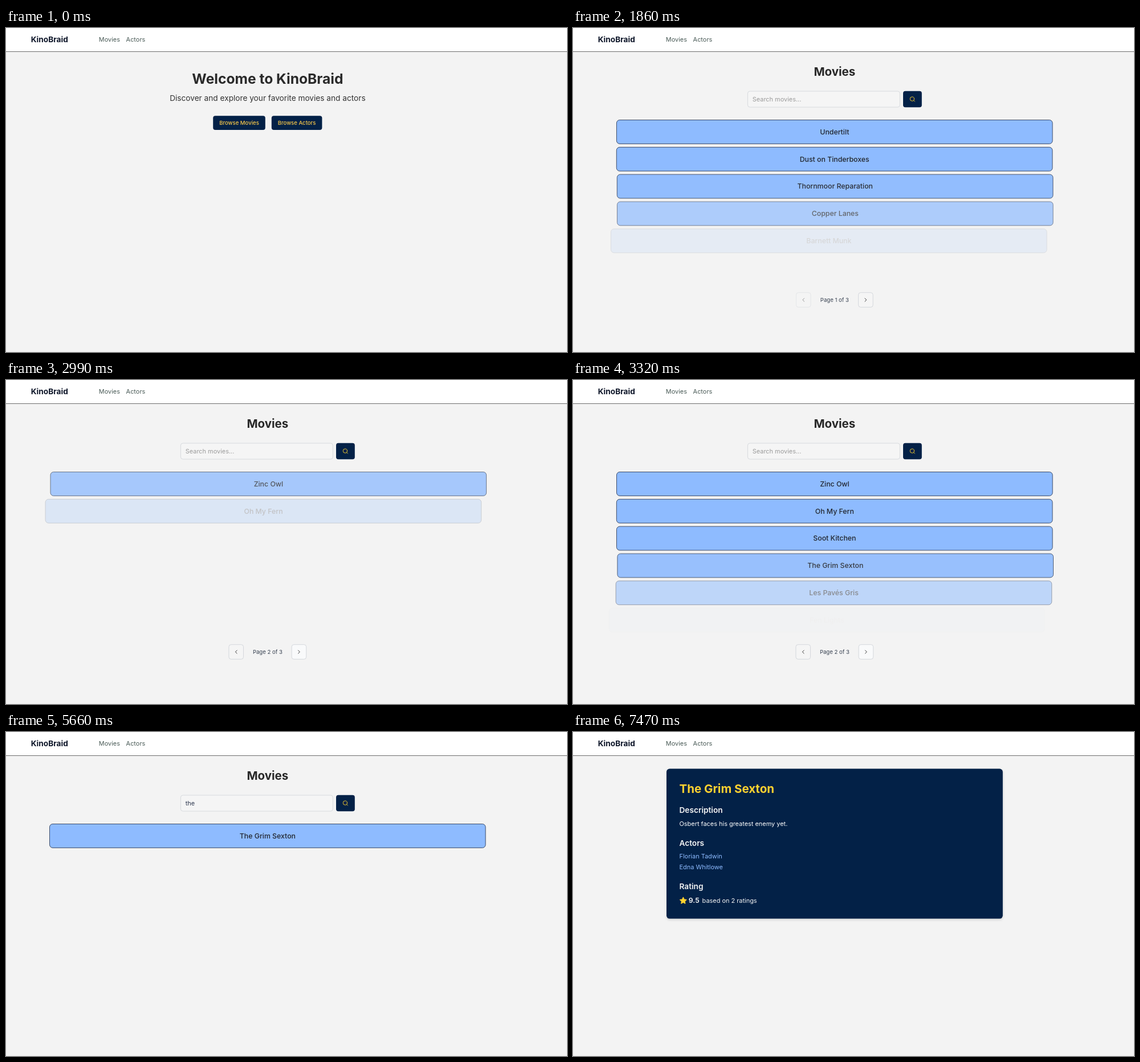
These frames come from a looping animation (984 by 569 pixels, 8 s). An HTML page:

```html
<!DOCTYPE html>
<html lang="en">
<head>
<meta charset="utf-8">
<title>Movie browser</title>
<style>
html, body { margin: 0; width: 100%; height: 100%; overflow: hidden; background: #f3f3f3; }
svg { display: block; width: 984px; height: 569px; font-family: Inter, "Liberation Sans", sans-serif; font-optical-sizing: none; }
text { white-space: pre; }
.card { filter: drop-shadow(0 2px 2px #0002); }
</style>
</head>
<body>
<svg id="stage" viewBox="0 0 984 569"></svg>
<script>
const LOOP = 8000, MID = 458.9;
const NAVY = '#032147', GOLD = '#ffd230', BLUE = '#8ebbff';
const BRAND = 'KinoBraid', HERO = 'The Grim Sexton';
const PAGES = [
  ['Undertilt', 'Dust on Tinderboxes', 'Thornmoor Reparation', 'Copper Lanes', 'Barnett Munk', 'Nine Puddles'],
  ['Zinc Owl', 'Oh My Fern', 'Soot Kitchen', HERO, 'Les Pavés Gris', 'Fen Lights']
];
const stage = document.getElementById('stage');

const clamp = v => Math.max(0, Math.min(1, v));
const lighten = (color, amount) => `color-mix(in srgb, ${color}, #fff ${amount * 100}%)`;

// Opacity tween: 300 ms along cubic-bezier(.25, .1, .35, 1)
function fade(ms) {
  const u = clamp(ms / 300);
  const curve = (a, b, s) => 3 * (1 - s) ** 2 * s * a + 3 * (1 - s) * s * s * b + s ** 3;
  let lo = 0, hi = 1;
  for (let i = 0; i < 20; i++) {
    const m = (lo + hi) / 2;
    if (curve(.25, .35, m) < u) lo = m; else hi = m;
  }
  return u === 0 ? 0 : curve(.1, 1, hi);
}

// Remaining offset of a damped spring (stiffness 500, damping 25)
function spring(ms) {
  const s = Math.max(0, ms) / 1000, d = 12.5, w = Math.sqrt(500 - d * d);
  return 13.67 * Math.exp(-d * s) * (Math.cos(w * s) + d / w * Math.sin(w * s));
}

const text = (x, y, size, str, fill, weight = 400, anchor = 'start') =>
  `<text x="${x}" y="${y}" font-size="${size}" font-weight="${weight}" fill="${fill}" text-anchor="${anchor}">${str}</text>`;
const centred = (y, size, str, fill, weight, x = MID) => text(x, y, size, str, fill, weight, 'middle');
const box = (x, y, w, h, r, fill, stroke = 'none') =>
  `<rect x="${x}" y="${y}" width="${w}" height="${h}" rx="${r}" fill="${fill}" stroke="${stroke}" stroke-width=".8"/>`;
// Icons live on a 24-unit grid
const icon = (x, y, size, d, attrs) =>
  `<path transform="translate(${x - size / 2} ${y - size / 2}) scale(${size / 24})" d="${d}" stroke-width="2" stroke-linecap="round" stroke-linejoin="round" ${attrs}/>`;

const header = () =>
  '<rect width="984" height="41" fill="#fff"/><rect y="41" width="984" height="1" fill="#6e6e6e"/>' +
  text(43.7, 24.7, 13.67, BRAND, '#0f172a', 700) +
  text(162.8, 24, 10.93, 'Movies', '#4a5b57') + text(210.6, 24, 10.93, 'Actors', '#4a5b57');

const home = t =>
  centred(97.8, 24.6, 'Welcome to ' + BRAND, '#2a2a2a', 700) +
  centred(127.8, 13.67, 'Discover and explore your favorite movies and actors', '#333') +
  box(363.2, 154.3, 91.6, 24.7, 4, lighten(NAVY, .1 * clamp((t - 680) / 120))) +
  box(465.8, 154.3, 88.6, 24.7, 4, NAVY) +
  centred(170.3, 9.57, 'Browse Movies', '#fbc94a', 500, 409) +
  centred(170.3, 9.57, 'Browse Actors', '#fbc94a', 500, 510.1);

function row(i, title, age, hover) {
  const alpha = fade(age);
  if (!alpha) return '';
  const y = 161.5 + i * 47.83;
  return `<g opacity="${alpha}" transform="translate(${-spring(age)} 0)">` +
    box(76.5, y, 764.6, 41.9, 5.5, lighten(BLUE, hover), '#1d2b45') +
    centred(y + 25.2, 12.3, title, '#22262e', 500) + '</g>';
}

function search(t) {
  const keys = [4150, 4910, 5070, 5220];
  const typed = keys.filter(k => t >= k).length - 1;
  const caretX = [315, 318.8, 325.2, 331.6][typed];
  const caret = typed >= 0 && t < 5520 && (t - keys[typed]) % 1120 < 560;
  return centred(84.3, 20.5, 'Movies', '#282828', 700) +
    box(306.4, 111, 267, 28, 4, '#f5f5f5', '#d0d3d8') +
    (typed > 0 ? text(314.8, 129, 10.93, 'the'.slice(0, typed), '#2f3950')
               : text(314.8, 129, 10.93, 'Search movies...', '#9b9b9b')) +
    (caret ? `<rect x="${caretX}" y="118" width="1" height="14" fill="#222"/>` : '') +
    box(579, 110.7, 32.8, 28.6, 4, NAVY) +
    icon(595.3, 125, 10.93, 'M19 11a8 8 0 1 1-16 0a8 8 0 1 1 16 0M21 21l-4.35-4.35', `fill="none" stroke="${GOLD}"`);
}

function pager(page) {
  const shift = page * .5;
  const button = (x, d, fill, alpha) => `<g opacity="${alpha}">` + box(x - 12.8, 464.7, 25.6, 25.6, 4, fill, '#ccd0d6') +
    icon(x, 477.5, 10.93, d, 'fill="none" stroke="#222"') + '</g>';
  return button(404.2 - shift, 'm15 18-6-6 6-6', '#f5f5f5', page ? 1 : .5) +
    centred(481, 9.57, `Page ${page + 1} of 3`, '#374151') +
    button(513.4 + shift, 'm9 18 6-6-6-6', page ? '#f9fafb' : '#f5f5f5', 1);
}

function list(t) {
  if (t >= 5520) return search(t) + row(0, HERO, 999, .14 * clamp((t - 6800) / 150));
  const page = t < 2840 ? 0 : 1, start = page ? 2840 : 1442;
  // The pointer sweeps upwards over the rows on its way to the search field
  const sweep = i => i < 5 ? .1 * clamp(1 - Math.abs(t - 3920 + i * 55) / 90) : 0;
  return search(t) + PAGES[page].map((title, i) => row(i, title, t - start - i * 95, sweep(i))).join('') + pager(page);
}

function detail(t) {
  const age = t - 7168, x = 186.5;
  const heading = (y, str) => text(x, y, 13.67, str, '#f5f5f5', 600);
  const line = (y, str, fill, left = x) => text(left, y, 10.93, str, fill);
  return `<g opacity="${fade(age)}" transform="translate(0 ${spring(age)})">` +
    `<g class="card">${box(164, 64.5, 589.8, 263.2, 5.5, NAVY)}</g>` +
    text(x, 106.6, 20.5, HERO, GOLD, 700) +
    heading(142.2, 'Description') + line(164.5, 'Osbert faces his greatest enemy yet.', '#fff') +
    heading(199.7, 'Actors') + line(222, 'Florian Tadwin', BLUE) + line(241.2, 'Edna Whitlowe', BLUE) +
    heading(276.2, 'Rating') +
    icon(193.3, 295.9, 13.67, 'M12 2l3.1 6.3 6.9 1-5 4.9 1.2 6.8-6.2-3.2L5.8 21 7 14.2 2 9.3l6.9-1z', `fill="${GOLD}" stroke="${GOLD}"`) +
    text(202.8, 300.3, 12.3, '9.5', '#f5f5f5', 600) + line(300, 'based on 2 ratings', '#f5f5f5', 226.6) + '</g>';
}

function draw(now) {
  const t = now % LOOP;
  const view = t < 1470 ? home : t < 7170 ? list : detail;
  stage.innerHTML = header() + view(t);
  requestAnimationFrame(draw);
}
draw(0);
</script>
</body>
</html>
```
